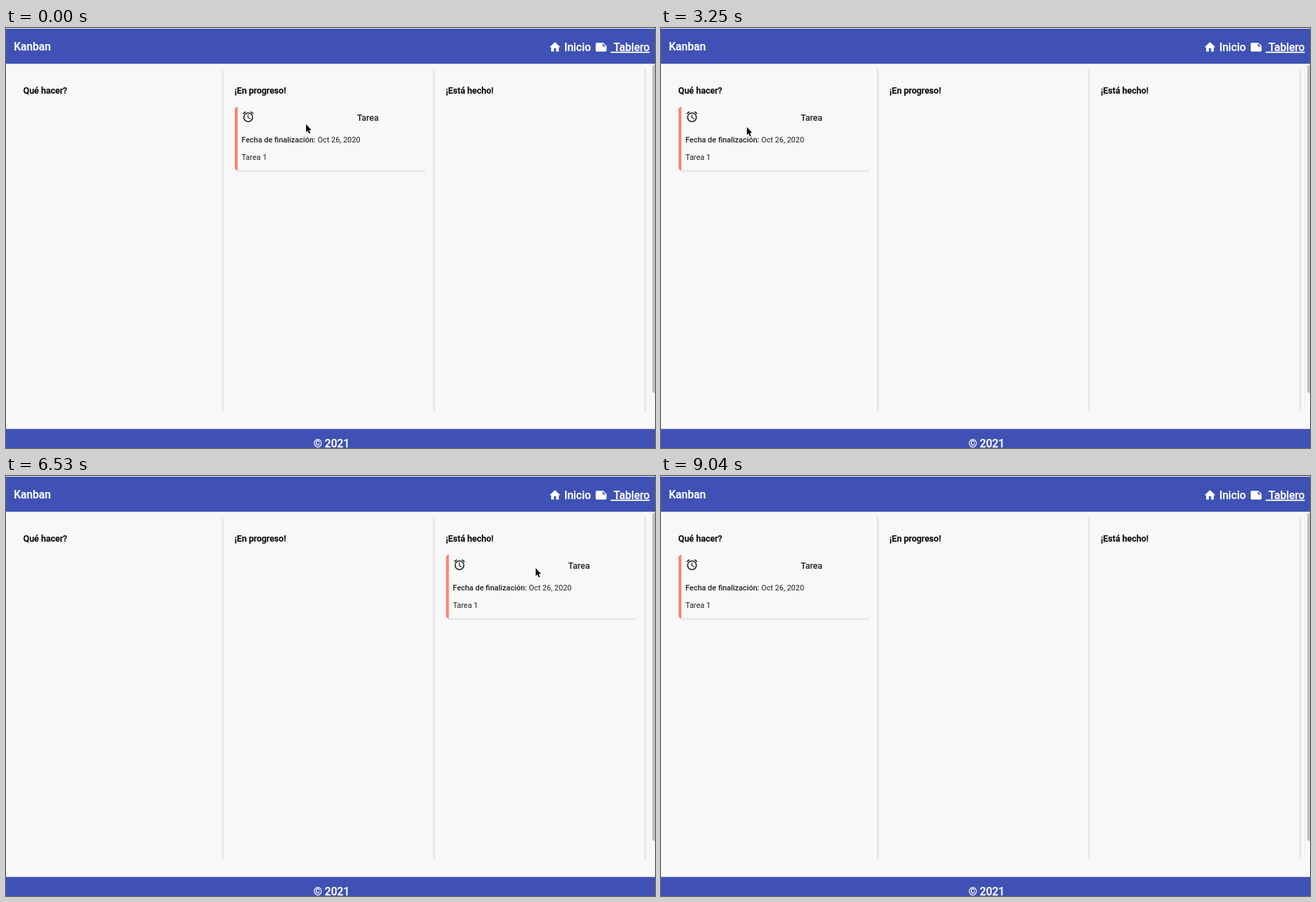
An HTML page for the animation above (9.63 s loop, 930 by 602 pixels).

```html
<!DOCTYPE html>
<html lang="es">
<meta charset="utf-8">
<title>Kanban</title>
<style>
  html, body { margin: 0; width: 100%; height: 100%; overflow: hidden; background: #f8f8f8; }
  svg { display: block; font-family: Roboto, sans-serif; }
  .bar { fill: #3f51b5; }
  .nav { font-size: 15.65px; font-weight: 500; fill: #fff; }
  .nav text { stroke: #fff; stroke-width: .25px; }
  .head { font-size: 12.5px; font-weight: 500; stroke: #000; stroke-width: .25px; }
  .column { fill: #f8f8f8; filter: drop-shadow(2px 1px 1px rgba(0, 0, 0, .1)); }
  .bold { font-weight: 500; }
  #card { font-size: 10.95px; fill: #212121; }
  .edge { fill: none; stroke: #000; stroke-width: 2px; }
  .drag .body {
    filter: drop-shadow(0 3px 3px rgba(0, 0, 0, .14)) drop-shadow(0 5px 9px rgba(0, 0, 0, .2));
  }
</style>
<svg width="930" height="602" viewBox="0 0 930 602">
  <rect width="930" height="602" fill="#f8f8f8"/>
  <g id="columns"></g>
  <rect y="549" width="930" height="26" fill="#f8f8f8"/>
  <path d="M922.5 52V549" stroke="#ececec"/>
  <rect x="926" y="53" width="8" height="470" rx="3" fill="#c1c1c1"/>

  <rect class="bar" y="1" width="930" height="50.3"/>
  <rect class="bar" y="574.7" width="930" height="28"/>
  <g class="nav">
    <text x="11.2" y="32.3">Kanban</text>
    <path transform="translate(777.3 18) scale(.783)" d="M10 20v-6h4v6h5v-8h3L12 3 2 12h3v8z"/>
    <text x="800" y="33">Inicio</text>
    <path transform="translate(843.4 18) scale(.783)" d="M22 10l-6-6H4c-1.1 0-2 .9-2 2v12c0 1.1.9 2 2 2h16c1.1 0 2-.9 2-2zm-7-4.5l5.5 5.5H15z"/>
    <text x="922.5" y="33" text-anchor="end" text-decoration="underline">&#160;Tablero</text>
    <text x="466.5" y="600.5" text-anchor="middle">© 2021</text>
  </g>

  <g id="card">
    <path class="edge" d="M3 93H273" opacity=".025"/>
    <path class="edge" d="M3 91.5H270q2 0 3-2" opacity=".09"/>
    <path class="body" d="M3 0H270q3 0 3 3V88q0 3-3 3H3z" fill="#f8f8f8"/>
    <path d="M4 0V91Q0 91 0 87V4Q0 0 4 0z" fill="#fa8072"/>
    <path transform="translate(9.8 4.8) scale(.783)" d="M22 5.7l-4.6-3.9-1.3 1.6 4.6 3.8zM7.9 3.4L6.6 1.9 2 5.7l1.3 1.5zM12.5 8H11v6l4.8 2.9.7-1.3-4-2.4zM12 4a9 9 0 1 0 0 18 9 9 0 0 0 0-18zm0 16a7 7 0 1 1 0-14 7 7 0 0 1 0 14z"/>
    <text class="bold" x="175" y="19.8" font-size="12.5">Tarea</text>
    <text x="9.7" y="51"><tspan class="bold">Fecha de finalización:</tspan> Oct 26, 2020</text>
    <text x="9.8" y="76">Tarea 1</text>
  </g>
  <path id="cursor" d="M0 0V11.3L2.4 9 4.3 13.2 6 12.4 4.3 8.3H7.7z" stroke="#fff" stroke-width=".6" paint-order="stroke"/>
</svg>
<script>
  const LOOP = 9630, FRAMES = 65, EXIT = 61;
  const PITCH = 302.7, CARD_X = 25.2, CARD_Y = 113, SAG = 14;
  const $ = id => document.getElementById(id);

  $('columns').innerHTML = ['Qué hacer?', '¡En progreso!', '¡Está hecho!'].map((title, i) => `
    <g transform="translate(${i * PITCH})">
      <rect class="column" x="13" y="55.5" width="296.5" height="520" rx="7"/>
      <text class="head" x="24.8" y="94">${title}</text>
    </g>`).join('');

  // Pointer gestures; those with a drop column carry the card there.
  const start = { x: 430, y: 138, column: 1 };
  const gestures = [
    { at: 0, steps: 4, x: 716, y: 149, drop: 2 },
    { at: 5, steps: 2, x: 669, y: 143 },
    { at: 8, steps: 5, x: 441, y: 187, drop: 1 },
    { at: 13, steps: 2, x: 401, y: 149 },
    { at: 15, steps: 3, x: 130, y: 155, drop: 0 },
    { at: 19, steps: 3, x: 123, y: 142 },
    { at: 22, steps: 4, x: 426, y: 168, drop: 1 },
    { at: 27, steps: 4, x: 471, y: 145 },
    { at: 31, steps: 3, x: 771, y: 155, drop: 2 },
    { at: 43, steps: 1, x: 759, y: 132 },
    { at: 44, steps: 5, x: 406, y: 145, drop: 1 },
    { at: 49, steps: 6, x: 91, y: 147, drop: 0 },
    { at: 57, steps: 3, x: 826, y: 553 }
  ];

  function poseAt(frame) {
    let { x, y, column } = start, dx = 0, dy = 0;
    for (const { at, steps, x: toX, y: toY, drop } of gestures) {
      if (frame <= at) break;
      const carries = drop !== undefined;
      const progress = Math.min((frame - at) / steps, 1);
      const eased = Math.sin(progress * Math.PI / 2);
      dx = (toX - x) * eased;
      dy = (toY - y) * eased + (carries ? SAG * Math.sin(progress * Math.PI) : 0);
      if (progress < 1) return { x: x + dx, y: y + dy, column, dx, dy, dragging: carries };
      [x, y] = [toX, toY];
      if (carries) column = drop;
    }
    return { x, y, column, dragging: false };
  }

  const place = (node, x, y) => node.setAttribute('transform', `translate(${x} ${y})`);

  function draw(time) {
    const frame = Math.floor(time % LOOP / LOOP * FRAMES + .1);
    const { x, y, column, dx, dy, dragging } = poseAt(frame);
    place($('card'), CARD_X + column * PITCH + (dragging ? dx : 0), CARD_Y + (dragging ? dy : 0));
    $('card').classList.toggle('drag', dragging);
    place($('cursor'), Math.round(x), Math.round(y));
    $('cursor').setAttribute('visibility', frame < EXIT ? 'visible' : 'hidden');
  }

  const begin = performance.now();
  function tick() {
    draw(performance.now() - begin);
    requestAnimationFrame(tick);
  }
  tick();
</script>
</html>
```
